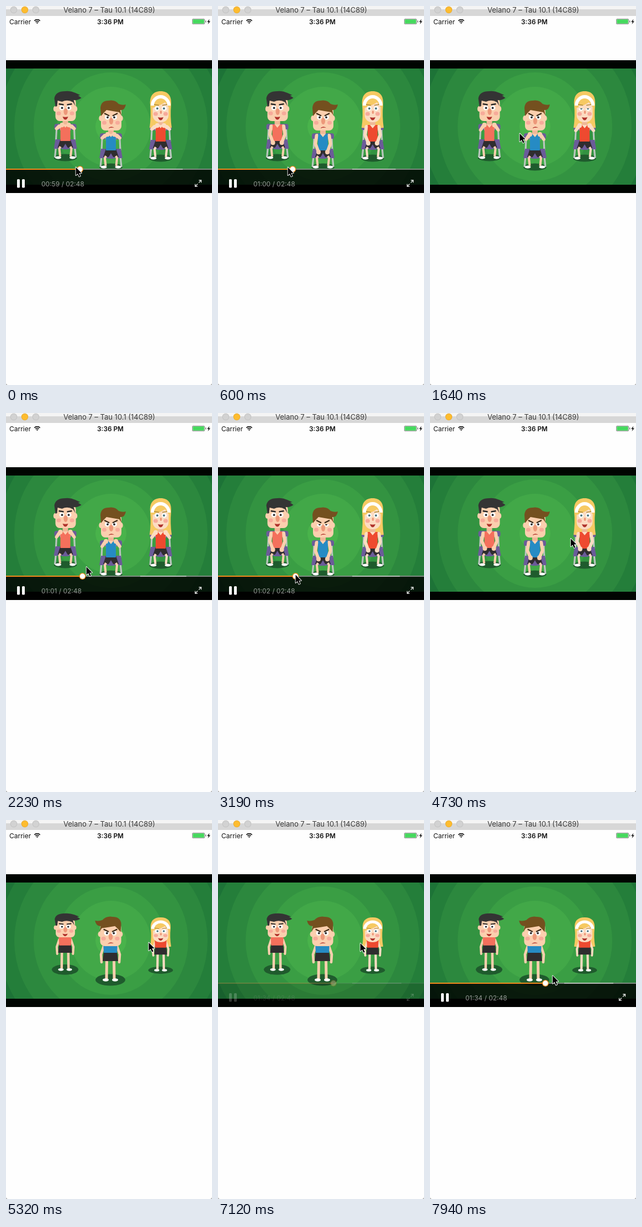
Recreate the animation shown at these times as an HTML page with a canvas. Size 373x685 px, loop 8 s.

```html
<!DOCTYPE html>
<html lang="en">
<head>
<meta charset="utf-8">
<title>Video player</title>
<style>
html, body { margin: 0; width: 373px; height: 685px; overflow: hidden; background: #fefefe; }
canvas { display: block; width: 373px; height: 685px; }
</style>
</head>
<body>
<canvas id="stage"></canvas>
<script>
const W = 373, H = 685, LOOP = 8000, STEP = 118.3;
const CUT = 5080, PRESS = 3425, SEEK = 4250, BEAT = 2100;
const FONT = 'Inter, "Liberation Sans", sans-serif';
const canvas = document.getElementById('stage');
const dpr = window.devicePixelRatio || 1;
canvas.width = W * dpr;
canvas.height = H * dpr;
const c = canvas.getContext('2d');

// Motion helpers
const clamp = v => Math.max(0, Math.min(1, v));
const lerp = (a, b, k) => a + (b - a) * k;
const mix = (a, b, k) => a.map((v, i) => lerp(v, b[i], k));
const wave = turns => Math.cos(turns * 2 * Math.PI);
function ramp(t, from, to) {
  const p = clamp((t - from) / (to - from));
  return p * p * (3 - 2 * p);
}

// Drawing helpers
function fill(color) {
  c.fillStyle = color;
  c.fill();
}
function stroke(width, color, cap = 'butt') {
  c.lineWidth = width;
  c.lineCap = cap;
  c.lineJoin = 'round';
  c.strokeStyle = color;
  c.stroke();
}
function line(points, width, color, cap) {
  c.beginPath();
  points.forEach(([x, y]) => c.lineTo(x, y));
  stroke(width, color, cap);
}
function oval(x, y, rx, ry, color) {
  c.beginPath();
  c.ellipse(x, y, rx, ry, 0, 0, 7);
  fill(color);
}
function rect(x, y, w, h, color) {
  c.fillStyle = color;
  c.fillRect(x, y, w, h);
}
function round(x, y, w, h, r, color) {
  c.beginPath();
  c.roundRect(x, y, w, h, r);
  fill(color);
}
function shape(path, color) {
  c.fillStyle = color;
  c.fill(new Path2D(path));
}
// Symmetric trapezoid given by its half widths
function trap(y1, w1, y2, w2, color) {
  shape(`M${-w1} ${y1}H${w1}L${w2} ${y2}H${-w2}Z`, color);
}
function text(str, x, y, size, color, weight = 400, align = 'left') {
  c.font = `${weight} ${size}px ${FONT}`;
  c.textAlign = align;
  c.fillStyle = color;
  c.fillText(str, x, y);
}
function at(x, y, sx, sy, draw) {
  c.save();
  c.translate(x, y);
  c.scale(sx, sy);
  draw();
  c.restore();
}
// Draws the right half, then its mirror image
function both(draw) {
  for (const s of [1, -1]) at(0, 0, s, 1, () => draw(s));
}

const DARK = '#2f2d2f', SHADE = '#1f5b2d', PURPLE = '#6b5c99', STEEL = '#b9c5bd';
const MAN = { skin: '#fbcfae', shirt: '#268bc4', hair: '#74501f', brow: '#3b2a18', eye: DARK, tilt: 4.5 };
const PAL = { skin: '#fbcfae', shirt: '#f4705c', hair: '#343434', brow: '#262626', eye: DARK, tilt: 1.5, spiky: true };
const GIRL = { skin: '#fcdcc2', shirt: '#ee4a30', hair: '#f6c963', brow: '#b08a3a', eye: '#47707a', tilt: 1.5, girl: true };

function backHair(p) {
  if (p.girl) shape('M0 0C14 0 20 9 19 24Q17 45 20 66Q0 69-20 66Q-17 45-19 24C-20 9-14 0 0 0Z', p.hair);
}

function head(p, blink, flip) {
  if (p.girl) {
    round(-14.5, 13, 29, 43, 13, p.skin);
    shape('M-17 31Q-17 11 0 11Q17 11 17 31Q12 27 8 20Q-3 27-17 31Z', p.hair);
    c.beginPath();
    c.ellipse(0, 26, 15, 16, 0, Math.PI, 0);
    stroke(6, '#fff');
  } else {
    both(() => oval(18.5, 33, 3.2, 5, p.skin));
    round(-18, 13, 37, 42, 8, p.skin);
    at(0, 0, flip ? -1 : 1, 1, () => shape(p.spiky
      ? 'M-18 29L-20 14Q-18 1 0 1Q9 0 18 4L27 8L23 9L29 13Q23 18 15 17L18 28L14 21Q4 15-6 20L-14 18L-15 28Z'
      : 'M-18 29L-19 14Q-18 1-4 1Q7-1 14 7Q21 10 27 8Q25 19 17 18L19 28L15 22Q3 20-8 18L-13 23Z', p.hair));
  }
  const wide = p.girl ? 9 : 12;
  both(s => {
    oval(6.6, 31, 4.4, 4.4, '#fff');
    oval(6, 31.2, 1.9, 2, p.eye);
    if (blink) rect(2, 26, 9, 5, p.skin);
    line([[3, 24 + p.tilt], [12, 24]], p.girl ? 1.3 : 2.4, p.brow);
    oval(wide, 41, 4, 3.6, '#f7aa9a');
  });
  oval(.5, 38, p.girl ? 1.8 : 3.6, p.girl ? 3 : 6, '#ed987a');
  shape(p === MAN ? 'M-5 51Q0 46 6 50Q1 49-5 51Z' : 'M-5 47Q0 48.5 5 47Q3 52.5 0 52.5Q-3 52.5-5 47Z', '#b0322c');
}

function sitting(p, x, y, lift, join, blink) {
  at(x, y, 1, 1, () => {
    oval(0, 121, 21, 6.5, SHADE);
    round(-20, 60, 40, 11, 4, PURPLE);
    backHair(p);
    both(() => {
      line([[16, 70], [17, 91]], 3.2, STEEL);
      line([[17, 101], [19, 121]], 3.2, STEEL);
    });
    trap(88, 18, 105, 21, PURPLE);
    trap(88, 9, 103, 14, DARK);
    shape('M0 96L6 106H-6Z', PURPLE);
    both(() => {
      line([[9, 101], [11, 105], [9.5, 119]], 4, p.skin);
      oval(13, 121, 5.5, 2.5, '#fff');
    });
    rect(-5, 53, 10, 12, '#efb897');
    trap(61, 11, 72, 9, p.skin);
    shape('M-9 61H-5L0 67L5 61H9V91H-9Z', p.shirt);
    const elbow = mix([13.5, 79], [16, lerp(71, 65, join)], lift);
    const hand = mix([8, 94], [lerp(9, 2, join), 62], lift);
    both(() => {
      line([[11.5, 64], elbow, hand], 5.8, p.skin, 'round');
      oval(...hand, 4, 4.2, p.skin);
    });
    head(p, blink, false);
  });
}

function standing(p, x, y, scale, hx, hy, swing) {
  at(x, y, scale, scale, () => oval(0, 115, 27, p.girl ? 7.8 : 10.6, SHADE));
  at(x, y, hx, hy, () => backHair(p));
  at(x, y, scale, scale, () => {
    both(() => {
      line([[6.5, 78], [7, 113]], 5, p.skin);
      oval(8.5, 115, 5.5, 2.7, '#fff');
      line([[12, 54], [17, 69 - swing * 2], [16 + swing * 2, 83 - swing * 4]], 4.6, p.skin, 'round');
    });
    trap(63, 12, 81, 14, DARK);
    trap(49, 13, 66, 12, p.shirt);
  });
  at(x, y, hx, hy, () => head(p, false, p === MAN));
}

function backdrop() {
  rect(0, 98, W, 240, '#000501');
  c.save();
  c.beginPath();
  c.rect(0, 113, W, 210);
  c.clip();
  const rings = [250, 203, 175, 140, 98, 72, 28];
  rings.forEach((r, i) => {
    const rgb = mix([29, 115, 55], [73, 179, 75], i / (rings.length - 1));
    oval(190, 218, r, r, `rgb(${rgb.map(Math.round)})`);
  });
  c.restore();
}

function cast(t) {
  if (t < CUT) {
    const turn = t / BEAT;
    const lift = clamp(.5 + 1.3 * wave(turn + .05));
    const join = clamp((wave(turn + .06) - .9) / .07);
    sitting(PAL, 107.5, 153, lift, join, false);
    sitting(GIRL, 280, 154, lift, join, t > 1500 && t < 1760);
    sitting(MAN, 190, 170, lift, join, t > 3050 && t < 3300);
  } else {
    const swing = 1 - ramp(t, CUT, 5315);
    standing(PAL, 107, 168, .89, .94, .8, swing);
    standing(GIRL, 280, 176, .83, .95, .8, swing);
    standing(MAN, 189, 174, 1, 1.03, .98, swing);
  }
}

function controls(t, pointerX) {
  const alpha = 1 - ramp(t, 1180, 1530) + ramp(t, 1760, 2120) - ramp(t, SEEK, 4700) + ramp(t, 7000, 7340);
  if (alpha <= 0) return;
  c.save();
  c.globalAlpha = alpha;
  rect(0, 295, W, 43, 'rgba(0,0,0,.82)');

  const sought = t >= SEEK;
  const pos = sought ? 209 : t >= PRESS ? pointerX : 134 + t * .002;
  const loaded = Math.min(332, 320 + t * .0029);
  rect(0, 294, W, 2, '#7d8a80');
  rect(243, 294, loaded - 243, 2, '#b5bbb6');
  rect(0, 294, pos, 2, '#f28a1c');
  oval(pos, 295, 6, 6, '#f28a1c');
  oval(pos, 295, 4.7, 4.7, '#fff');

  for (const x of [20, 29]) round(x, 313, 5, 15.5, 1.5, '#fff');
  const sec = sought ? 94 : Math.floor(59.55 + t / 1000);
  const two = n => String(n).padStart(2, '0');
  text(`${two(Math.floor(sec / 60))}:${two(sec % 60)} / 02:48`, 64, 325.5, 12, '#969c97');

  for (const s of [1, -1]) {
    at(348, 320.5, s, -s, () => {
      line([[1.5, 1.5], [5.5, 5.5]], 1.3, '#e6e8e6', 'round');
      line([[1.7, 5.5], [5.5, 5.5], [5.5, 1.7]], 1.3, '#e6e8e6', 'round');
    });
  }
  c.restore();
}

function chrome() {
  rect(0, 0, W, 6, '#f4f4f4');
  rect(0, 6, W, 12, '#d7d7d7');
  for (const x of [14, 34, 54]) {
    oval(x, 7, 6.2, 6.2, x === 34 ? '#e3a52a' : '#bcbcbc');
    oval(x, 7, 5.5, 5.5, x === 34 ? '#fdbc2f' : '#d2d2d2');
  }
  text('Velano 7 – Tau 10.1 (14C89)', 187, 12, 13, '#383838', 400, 'center');

  text('Carrier', 6, 32.5, 12, '#111');
  for (const r of [1.2, 4.4, 7.4]) {
    c.beginPath();
    c.arc(56.5, 32, r, Math.PI * 1.25, Math.PI * 1.75);
    stroke(r < 2 ? 2.4 : 1.7, '#111');
  }
  text('3:36 PM', 189, 32.5, 11.8, '#111', 600, 'center');
  round(337, 23, 23, 10, 2.5, '#666');
  round(337.7, 23.7, 21.6, 8.6, 2, '#fff');
  round(338.3, 24.3, 20.4, 7.4, 1.2, '#45d85d');
  rect(361, 26.3, 1.3, 3.4, '#666');
  shape('M368.5 23.5L364.2 28.8H366.8L365.5 33L370 27.4H367.3Z', '#111');
}

function pointerAt(t) {
  let spot = [126, 291];
  const glide = (from, to, ...goal) => { spot = mix(spot, goal, ramp(t, from, to)); };
  glide(950, 1500, 162, 230);
  glide(1760, 2470, 140, 292);
  glide(3310, 4080, 210, 292);
  glide(SEEK, 4830, 258, 221);
  glide(7000, 8200, 216, 290);
  return spot;
}

function pointer(x, y) {
  at(x + .5, y + .5, 1, 1, () => {
    const arrow = new Path2D('M0 0V14.5L3.4 11.4L5.9 17L8.2 16L5.8 10.6L10.3 10.4Z');
    c.lineWidth = 1.8;
    c.strokeStyle = '#fff';
    c.stroke(arrow);
    c.fillStyle = '#000';
    c.fill(arrow);
  });
}

function draw(now) {
  const t = Math.floor((now % LOOP + 20) / STEP) * STEP;
  const [px, py] = pointerAt(t);
  c.setTransform(dpr, 0, 0, dpr, 0, 0);
  rect(0, 0, W, H, '#fefefe');
  chrome();
  backdrop();
  cast(t);
  controls(t, px);
  pointer(px, py);
  for (const s of [1, -1]) at(s > 0 ? 0 : W, H, s, 1, () => shape('M0-4Q0 0 4 0H0Z', '#9a9a9a'));
}

const start = performance.now();
function tick() {
  draw(performance.now() - start);
  requestAnimationFrame(tick);
}
tick();
</script>
</body>
</html>
```
